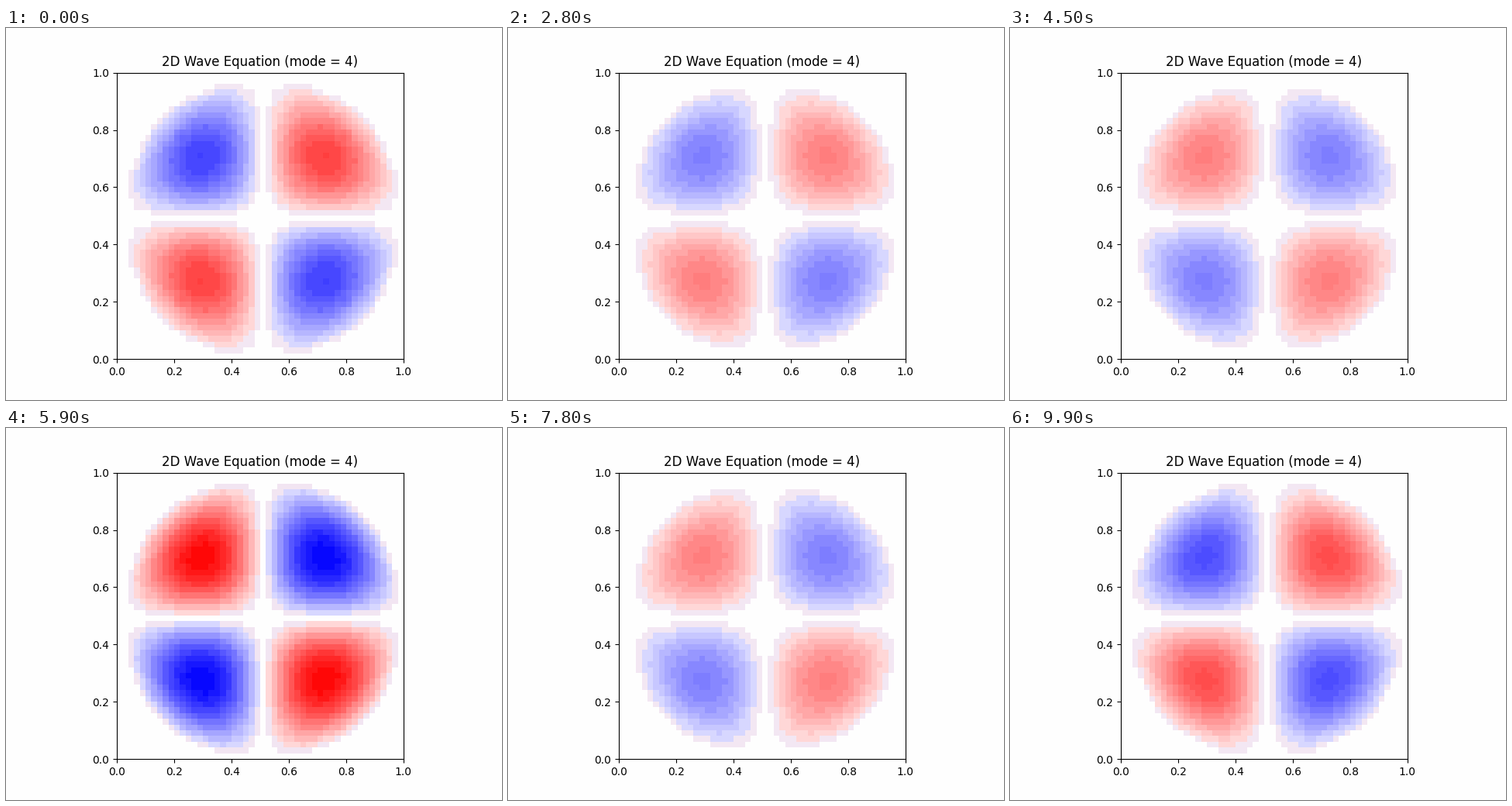
These frames come from a looping animation (640 by 480 pixels, 10 s). A matplotlib script:

```python
import numpy as np
import matplotlib.pyplot as plt
from matplotlib.animation import FuncAnimation

WIDTH, HEIGHT, DPI = 640, 480, 100
FRAMES, INTERVAL = 100, 100
N, RADIUS = 50, 25
PEAK_FRAME = 11.5
PAGE_CELLS = 3123  # page area around the plot, measured in grid cells


def drum_mode():
    """Lowest mode of a round membrane that is odd in both x and y."""
    offsets = np.arange(1, RADIUS)
    i, j = (a.ravel() for a in np.meshgrid(offsets, offsets))
    inside = i**2 + j**2 <= RADIUS**2
    i, j = i[inside], j[inside]
    steps = abs(i[:, None] - i) + abs(j[:, None] - j)
    laplacian = 4.0 * np.eye(len(i)) - (steps == 1)
    quarter = abs(np.linalg.eigh(laplacian)[1][:, 0])
    quarter /= quarter.max()

    mode = np.zeros((N, N))
    for sy in (-1, 1):
        for sx in (-1, 1):
            mode[RADIUS + sy * i, RADIUS + sx * j] = -sy * sx * quarter
    return mode


def banded_colors(values):
    """Blue-white-red colours averaged over coarse bands; also the page colour."""
    rgb = plt.get_cmap("bwr")((values.ravel() + 1) / 2, bytes=True)[:, :3]
    rgb = np.vstack([rgb, [[255, 255, 255]]]).astype(int)
    weights = np.ones(len(rgb))
    weights[-1] = PAGE_CELLS

    keys = rgb // [32, 16, 32] @ [256, 16, 1]
    _, band = np.unique(keys, return_inverse=True)
    total = np.bincount(band, weights)
    means = [np.bincount(band, weights * channel) / total for channel in rgb.T]
    colors = np.floor(np.column_stack(means)).astype(np.uint8)[band]
    return colors[:-1].reshape(N, N, 3), colors[-1] / 255


mode = drum_mode()

fig, ax = plt.subplots(figsize=(WIDTH / DPI, HEIGHT / DPI), dpi=DPI)
image = ax.imshow(np.full((N, N, 3), 255, np.uint8), extent=[0, 1, 0, 1])
ax.set_title("2D Wave Equation (mode = 4)")


def update(frame):
    amplitude = np.cos(2 * np.pi * (frame - PEAK_FRAME) / FRAMES)
    cells, page = banded_colors(amplitude * mode)
    image.set_data(cells)
    fig.set_facecolor(tuple(page))
    return [image]


animation = FuncAnimation(fig, update, frames=FRAMES, interval=INTERVAL,
                          repeat=True, repeat_delay=0, blit=False)
plt.show()
```
